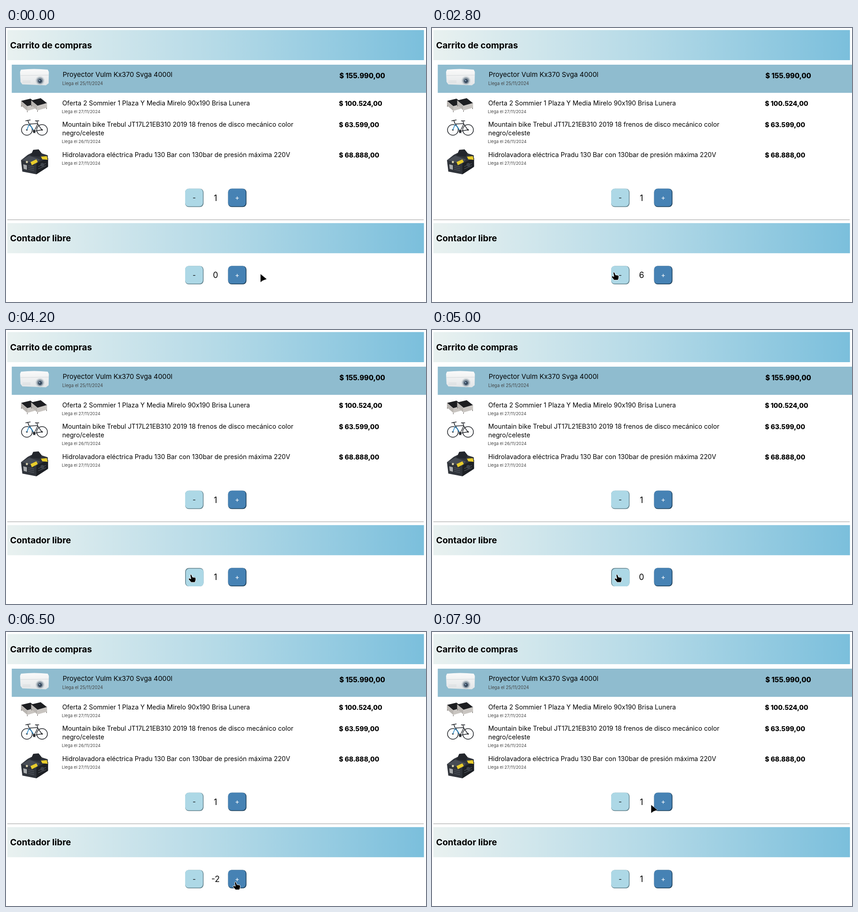
Write an HTML page that moves like this. It is 926 px wide and 605 px high and loops after 8000 ms.

```html
<!DOCTYPE html>
<html lang="es">
<head>
<meta charset="utf-8">
<title>Carrito de compras</title>
<style>
  html, body { margin: 0; width: 100%; height: 100%; overflow: hidden; background: #fff; }
  svg { display: block; width: 926px; height: 605px; font-family: Inter, sans-serif; font-size: 14.2px; }
  .heading { font-size: 19.3px; font-weight: 700; }
  .price { font-size: 14.4px; font-weight: 800; }
  .arrival { font-size: 9.3px; fill: #444; }
  .selected .name { font-size: 14.9px; }
  .selected .price { font-size: 15.3px; }
  .selected .arrival { font-size: 9.8px; }
  .sign { font-size: 15px; text-anchor: middle; }
  .count { font-size: 18px; text-anchor: middle; }
</style>
</head>
<body>
<svg id="stage" viewBox="0 0 926 605">
  <defs>
    <linearGradient id="sky">
      <stop stop-color="#e9f1f0"/>
      <stop offset=".5" stop-color="#b5dae7"/>
      <stop offset="1" stop-color="#7bbfdc"/>
    </linearGradient>
    <linearGradient id="shell" x2="0" y2="1">
      <stop stop-color="#fafafa"/>
      <stop offset="1" stop-color="#e2e5e7"/>
    </linearGradient>
  </defs>
</svg>
<script>
const stage = document.getElementById('stage');

const text = (cls, x, y, str) => `<text class="${cls}" x="${x}" y="${y}">${str}</text>`;
const shape = (fill, d) => `<path fill="${fill}" d="${d}"/>`;
const line = (color, width, d) =>
  `<path fill="none" stroke="${color}" stroke-width="${width}" stroke-linejoin="round" d="${d}"/>`;

const header = (y, title) =>
  `<rect x="3" y="${y}" width="918.5" height="66.5" fill="url(#sky)"/>` + text('heading', 9, y + 40, title);

const button = (id, x, y, face, edge, ink, sign) => `
  <g id="${id}" transform="translate(${x} ${y})">
    <rect width="40.5" height="40.5" rx="8" fill="${edge}"/>
    <rect class="face" width="39" height="39" rx="7.5" fill="${face}"/>
    <text class="sign" x="20" y="25.5" fill="${ink}">${sign}</text>
  </g>`;

const counter = (id, y, value) =>
  button(id + 'Minus', 395, y, '#add8e6', '#63838e', '#000', '-') +
  `<text class="count" id="${id}Count" x="462" y="${y + 26.7}">${value}</text>` +
  button(id + 'Plus', 489.7, y, '#4682b4', '#1f405a', '#fff', '+');

const item = (x, y, lines, arrival, price, cls = '') => {
  const lastY = y + (lines.length - 1) * 19;
  return `<g class="${cls}">` +
    lines.map((str, i) => text('name', x, y + 19 * i, str)).join('') +
    text('arrival', x - 1, lastY + (cls ? 18 : 16.5), 'Llega el ' + arrival) +
    text('price', x + 610, y + (cls ? 2.7 : 1.2), '$ ' + price) + '</g>';
};

const projector =
  shape('url(#shell)', 'M33 92Q62 89 92 92L94.5 97 94 122 88 126.5 36 124.5 32 119 31 97Z') +
  line('#cdd2d5', .8, 'M32 105 94 104M36 120H54M37 117H54') +
  '<circle cx="75" cy="116.5" r="10" fill="#cfd5d9"/>' +
  '<circle cx="75" cy="116.5" r="7.3" fill="#8b98a4"/>' +
  '<circle cx="75" cy="117" r="4.4" fill="#34475c"/>' +
  '<circle cx="74" cy="116" r="1.6" fill="#8fa9c2"/>';

const bed = (x, y) => `<g transform="translate(${x} ${y})">` +
  shape('#b9b5b1', 'M0 5 14 17V27L0 15Z') +
  shape('#c9c5c1', 'M14 17 35 11V21L14 27Z') +
  shape('#1d1e21', 'M0 5 21 0 35 11 14 17Z') +
  line('#dedbd8', .8, 'M0 5 14 17 35 11') +
  line('#55504c', 1, 'M1 15V18M14 27V30M34 21V24') + '</g>';

const wheel = x => `<circle cx="${x}" cy="225" r="11.8" fill="none" stroke="#22252a" stroke-width="1.5"/>` +
  line('#c4c9cd', .4, `M${x - 11} 225H${x + 11}M${x} 214V236`) +
  `<circle cx="${x}" cy="225" r="1.8" fill="#333"/>`;

const bike = wheel(46) + wheel(79.5) +
  line('#24272c', 1.5, 'M79 225 70 212 62 228 52 212 70 211M79 225 62 228M70 212 68 205') +
  line('#2b8ccb', 1.6, 'M53 214 60 225M51 213 46 225') +
  line('#1c1f24', 1.6, 'M64 205H73M51 212 48 204 43 205M48 204 54 203M60 231 65 231') +
  '<circle cx="62" cy="228" r="2.8" fill="#25282d"/>';

const washer =
  shape('#30343b', 'M33 292 48 280 56 276 76 276 92 281 93 306 67 323 36 317Z') +
  shape('#1d2025', 'M67 299 93 287 92 307 67 323Z') +
  shape('#484d55', 'M34 292 51 282 75 290 66 300Z') +
  shape('#23262c', 'M54 282 60 269 72 268 79 277 74 284Z') +
  shape('#e9cd2b', 'M54 296 67 290 70 296 57 303ZM77 284 90 283 92 291 80 290Z') +
  shape('#a8abad', 'M38 301 46 303V313L39 311Z') +
  line('#5d636b', 1, 'M49 304 62 307M49 308 62 311M49 312 62 315M71 306 88 299M71 311 88 304') +
  '<circle cx="46" cy="296" r="2.4" fill="#d8d2b0"/><circle cx="80" cy="302" r="4" fill="#3e434b"/>';

stage.insertAdjacentHTML('beforeend',
  header(4.5, 'Carrito de compras') +
  '<rect x="12.7" y="81" width="914" height="62.2" fill="#8fbccf"/>' +
  projector + bed(33, 156) + bed(55.5, 155) + bike + washer +
  item(125, 108, ['Proyector Vulm Kx370 Svga 4000l'], '25/11/2024', '155.990,00', 'selected') +
  item(124, 171, ['Oferta 2 Sommier 1 Plaza Y Media Mirelo 90x190 Brisa Lunera'], '27/11/2024', '100.524,00') +
  item(124, 218, ['Mountain bike Trebul JT17L21EB310 2019 18 frenos de disco mecánico color', 'negro/celeste'],
    '26/11/2024', '63.599,00') +
  item(124, 285, ['Hidrolavadora eléctrica Pradu 130 Bar con 130bar de presión máxima 220V'], '27/11/2024', '68.888,00') +
  counter('cart', 354.8, 1) +
  '<rect x="3" y="423" width="918" height="1" fill="#9a9a9a"/>' +
  header(430.8, 'Contador libre') +
  counter('free', 525.5, 0) +
  `<g id="pointer" fill="#000" stroke="#fff" stroke-linejoin="round">
    <path id="arrow" stroke-width=".5" d="M0-.5V18L5.2 14.2 14 11Z"/>
    <path id="hand" d="M-2 1.6Q-1-.5 1 .7L3.2 6.3 8.3 7Q10.6 7.6 10.5 10L10 13.8 8.5 17.7H.2L-5.3 11.2Q-6 8.6-3.6 8.6L-.4 10Z"/>
  </g>`);

// Each entry holds from its time until the next one.
const counts = [[0, 0], [1500, 1], [1600, 2], [1800, 3], [1900, 4], [2100, 5], [2300, 6],
  [3600, 5], [3700, 4], [3900, 3], [4100, 2], [4200, 1], [4400, 0],
  [5200, -1], [5800, -2], [7000, -1], [7200, 0], [7300, 1]];

const presses = [[0, ''], [1300, 'plus'], [2400, ''], [3400, 'minus'], [4400, ''],
  [5000, 'minus'], [5200, ''], [5700, 'minus'], [5800, ''], [6900, 'plus'], [7300, '']];

const ARROW = 'arrow', HAND = 'hand';
const pointerPath = [
  [0, 561, 543.5, ARROW], [700, 550, 545, ARROW], [800, 522, 548, HAND], [900, 502, 548, HAND],
  [1100, 505, 547.5, HAND], [2400, 495.5, 546.5, HAND], [2800, 401.5, 539, HAND],
  [3100, 405, 539.5, HAND], [3200, 408, 539.5, HAND],
  [6100, 412, 541, HAND], [6200, 426, 546, HAND], [6300, 450, 550, ARROW],
  [6400, 476, 551, ARROW], [6500, 506, 551.5, HAND], [6600, 518, 551.5, HAND],
  [7500, 514, 541, HAND], [7600, 497, 503, ARROW], [7700, 482, 452, ARROW],
  [7800, 477, 407, ARROW], [7900, 483, 382, ARROW]];

const current = (track, t) => track.findLast(entry => entry[0] <= t);
const el = id => document.getElementById(id);
const press = (id, down) =>
  el(id).querySelector('.face').setAttribute('transform', `translate(${down ? '1.5 1.5' : '0 0'})`);

function draw() {
  const t = performance.now() % 8000;
  const [, x, y, kind] = current(pointerPath, t);
  const pressed = current(presses, t)[1];
  el('freeCount').textContent = current(counts, t)[1];
  press('freePlus', pressed === 'plus');
  press('freeMinus', pressed === 'minus');
  el('pointer').setAttribute('transform', `translate(${x} ${y})`);
  for (const name of [ARROW, HAND]) el(name).style.display = name === kind ? '' : 'none';
  requestAnimationFrame(draw);
}
draw();
</script>
</body>
</html>
```
